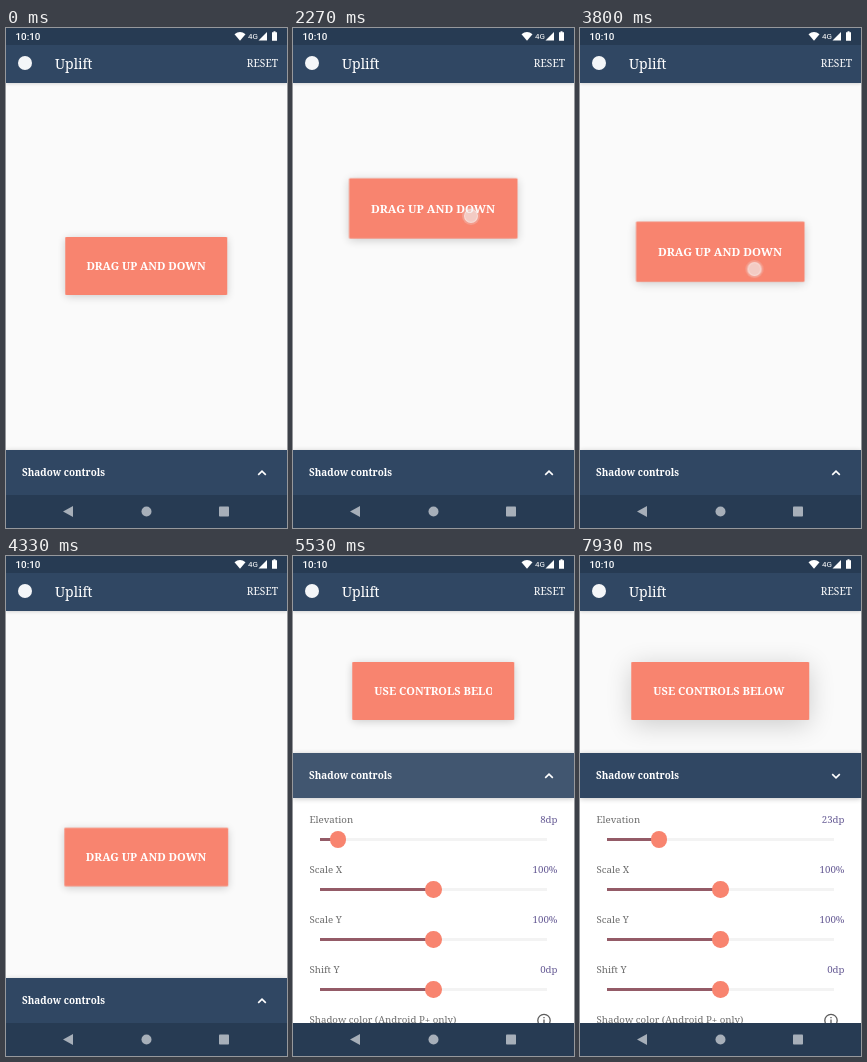
Write an HTML page that moves like this. It is 281 px wide and 500 px high and loops after 8000 ms.

```html
<!DOCTYPE html>
<html lang="en">
<head>
<meta charset="utf-8">
<title>Shadow controls</title>
<style>
@property --dp { syntax: "<integer>"; inherits: true; initial-value: 8; }

:root {
  --navy: #304763;
  --dark: #273b53;
  --coral: #f8846f;
  --go: cubic-bezier(.4, 0, .8, .7);
  --stop: cubic-bezier(.2, .3, .6, 1);
  --fling: cubic-bezier(.35, .3, .4, 1);
}
html, body { margin: 0; width: 100%; height: 100%; overflow: hidden; }
#stage {
  position: relative; width: 281px; height: 500px; overflow: hidden;
  background: #fafafa; font-family: "Noto Serif", serif;
  animation: elevate 8s infinite;
}
#stage * { position: absolute; box-sizing: border-box; }
#stage, #stage * { animation-duration: 8s; animation-iteration-count: infinite; animation-timing-function: linear; }
.t { line-height: 20px; white-space: nowrap; }

/* bars */
.status { width: 281px; height: 17px; background: var(--dark); }
.bar { top: 17px; width: 281px; height: 37.5px; background: var(--navy); box-shadow: 0 1px 3px rgba(0,0,0,.15); color: #fff; }
.logo { left: 12px; top: 11px; width: 14px; height: 14px; border-radius: 50%; background: #f4f6f8; }
.title { left: 49px; top: 8.5px; font-size: 14px; }
.reset { right: 9px; top: 8px; font-size: 10.2px; }
.clock { left: 9.5px; top: -1.5px; font: 500 9.8px/20px Roboto, sans-serif; color: #fff; }
.net { left: 242px; top: -1.5px; font: 8px/20px Roboto, sans-serif; color: #fff; }
.nav { top: 467px; width: 281px; height: 33px; background: var(--dark); }
svg { overflow: visible; }

/* card */
.card {
  left: 140.3px; top: 209px; width: 161.5px; height: 57.5px;
  background: var(--coral); border-radius: 1px; color: #fff;
  font-weight: 700; font-size: 11px;
  box-shadow: 0 calc(var(--dp) * .2px) calc(var(--dp) * 1.1px) rgba(0,0,0,.19);
  translate: -50% 0;
  animation-name: drag, lift, widen;
}
.card .t { line-height: 57px; }
.hint { width: 100%; text-align: center; animation-name: hide; }
.clip { left: 22px; width: 117.5px; height: 100%; overflow: hidden; animation-name: reveal; }
.next { left: 0; opacity: 0; animation-name: show; }
#stage .hint, #stage .next { animation-timing-function: step-end; }

/* panel */
.panel { top: 422px; width: 281px; height: 310px; background: #fff; animation-name: open; }
.head {
  width: 281px; height: 45px; overflow: hidden; z-index: 1;
  background: var(--navy); color: #fff; box-shadow: 0 1px 5px rgba(0,0,0,.22);
}
.head .t { left: 16px; top: 12px; font-weight: 700; font-size: 9.9px; }
.ripple {
  left: 9px; top: -104.5px; width: 263px; height: 263px; border-radius: 50%;
  background: #fff; opacity: 0; animation-name: ripple;
}
.chevron { left: 251px; top: 17.5px; animation-name: flip; }
.row { width: 281px; height: 50px; top: calc(57px + var(--i) * 50px); font-size: 9.7px; color: #6c6c6c; --x: 50; }
.row .t { left: 16.5px; }
.row .val { left: auto; right: 16.5px; color: #685d96; }
.live { --x: var(--dp); }
.live .val { counter-reset: dp var(--dp); }
#stage .live .val::before { content: counter(dp) "dp"; position: static; }
.track { left: 27px; top: 28px; width: 227px; height: 3px; background: #f3f3f3; }
.track i { height: 3px; width: calc(var(--x) * 1%); background: #945b67; }
.track b {
  left: calc(var(--x) * 1%); top: 1.5px; width: 16.5px; height: 16.5px; margin: -8.25px;
  border-radius: 50%; background: var(--coral);
}

.touch {
  width: 18px; height: 18px; margin: -9px; border-radius: 50%; opacity: 0;
  background: rgba(240,238,238,.68); background-clip: padding-box;
  border: 2px solid rgba(235,235,235,.25);
  box-shadow: inset 0 0 0 1px rgba(255,255,255,.35);
  animation-name: point, press;
}

@keyframes drag {
  0% { translate: -50% 0; }
  23.1% { translate: -50% 0; animation-timing-function: var(--go); }
  28.375% { translate: -50% -57.5px; animation-timing-function: var(--stop); }
  33.5% { translate: -50% -130px; }
  35.1% { translate: -50% -130px; animation-timing-function: ease-in-out; }
  40.7%, 43.9% { translate: -50% -117px; animation-timing-function: var(--go); }
  47.5% { translate: -50% -14.3px; animation-timing-function: var(--stop); }
  51.9% { translate: -50% 63px; }
  64.5% { translate: -50% 63px; animation-timing-function: ease-in; }
  65.875% { translate: -50% 53.4px; animation-timing-function: var(--fling); }
  69%, 100% { translate: -50% -103px; }
}
@keyframes lift {
  0%, 21.6% { scale: 1; }
  23.4%, 35.1% { scale: 1.04; animation-timing-function: ease-in-out; }
  40.7%, 43.9% { scale: 1; }
  45.6%, 52.2% { scale: 1.04; animation-timing-function: ease-out; }
  55.8%, 100% { scale: 1; }
}
@keyframes widen {
  0%, 69.15% { width: 161.5px; animation-timing-function: ease-in-out; }
  72.5%, 100% { width: 177.5px; }
}
@keyframes reveal {
  0%, 69.15% { width: 117.5px; animation-timing-function: ease-in-out; }
  72.5%, 100% { width: 142px; }
}
@keyframes hide { 0% { opacity: 1; } 68.75%, 100% { opacity: 0; } }
@keyframes show { 0% { opacity: 0; } 68.75%, 100% { opacity: 1; } }
@keyframes open {
  0%, 64.5% { translate: 0 0; animation-timing-function: ease-in; }
  65.875% { translate: 0 -13px; animation-timing-function: var(--fling); }
  69%, 100% { translate: 0 -225px; }
}
@keyframes ripple {
  0%, 63.8% { scale: .3; opacity: 0; }
  64.1% { scale: .45; opacity: .5; }
  65.875% { scale: 1; opacity: .5; }
  69.125% { scale: 1.25; opacity: .09; }
  70.5%, 100% { scale: 1.25; opacity: 0; }
}
@keyframes flip {
  0%, 69.15% { rotate: 0deg; animation-timing-function: ease-in-out; }
  72%, 100% { rotate: 180deg; }
}
@keyframes elevate {
  0%, 83.1% { --dp: 8; animation-timing-function: ease-in-out; }
  92.5%, 100% { --dp: 23; }
}
@keyframes point {
  0% { translate: 178px 245px; }
  23.1% { translate: 178px 245px; animation-timing-function: var(--go); }
  28.375% { translate: 178px 188px; animation-timing-function: var(--stop); }
  33.5%, 36% { translate: 177.5px 115.5px; }
  40%, 43.9% { translate: 174.5px 138.5px; animation-timing-function: var(--go); }
  47.5% { translate: 174.5px 241px; animation-timing-function: var(--stop); }
  51.9%, 55% { translate: 174.5px 318px; }
  60%, 64.5% { translate: 142px 449px; animation-timing-function: ease-in; }
  65.875% { translate: 142px 436px; animation-timing-function: var(--fling); }
  69% { translate: 142px 224px; }
  75%, 83.1% { translate: 45.2px 284.5px; animation-timing-function: ease-in-out; }
  92.5%, 100% { translate: 79.2px 284.5px; }
}
@keyframes press {
  0%, 21.6% { opacity: 0; }
  22.5%, 33.6% { opacity: 1; }
  34.6%, 43.7% { opacity: 0; }
  44.3%, 51.9% { opacity: 1; }
  52.8%, 63.8% { opacity: 0; }
  64.2%, 66.2% { opacity: 1; }
  67.5%, 81.8% { opacity: 0; }
  82.6%, 93.1% { opacity: 1; }
  95%, 100% { opacity: 0; }
}
</style>
</head>
<body>
<div id="stage">
  <div class="card">
    <div class="t hint">DRAG UP AND DOWN</div>
    <div class="clip"><div class="t next">USE CONTROLS BELOW</div></div>
  </div>

  <div class="bar">
    <div class="logo"></div>
    <div class="t title">Uplift</div>
    <div class="t reset">RESET</div>
  </div>
  <div class="status">
    <div class="t clock">10:10</div>
    <div class="t net">4G</div>
    <svg width="281" height="17" fill="#fff">
      <path d="M228.5 6.2Q234 2 239.5 6.2L234 12.8Z"/>
      <path d="M252.5 12.5H261V4Z"/>
      <path d="M266 4.3H267.5V3.3H269.5V4.3H271V12.8H266Z"/>
    </svg>
  </div>

  <div class="panel">
    <div class="head">
      <div class="ripple"></div>
      <div class="t">Shadow controls</div>
      <svg class="chevron" width="10" height="10" fill="none" stroke="#fff" stroke-width="1.6"><path d="M1.2 6.9L5 3.1L8.8 6.9"/></svg>
    </div>
    <div class="row live" style="--i:0"><div class="t">Elevation</div><div class="t val"></div><div class="track"><i></i><b></b></div></div>
    <div class="row" style="--i:1"><div class="t">Scale X</div><div class="t val">100%</div><div class="track"><i></i><b></b></div></div>
    <div class="row" style="--i:2"><div class="t">Scale Y</div><div class="t val">100%</div><div class="track"><i></i><b></b></div></div>
    <div class="row" style="--i:3"><div class="t">Shift Y</div><div class="t val">0dp</div><div class="track"><i></i><b></b></div></div>
    <div class="row" style="--i:4">
      <div class="t">Shadow color (Android P+ only)</div>
      <svg width="281" height="20" fill="none" stroke="#5c5c5c" stroke-width="1.3"><circle cx="251" cy="10.5" r="6.2"/><path d="M251 7V8.3M251 9.6V14"/></svg>
    </div>
  </div>

  <div class="nav">
    <svg width="281" height="33" fill="#a7afb9">
      <path d="M57 16.5L67 11V22Z"/>
      <circle cx="140.5" cy="16.5" r="5"/>
      <rect x="213" y="11.5" width="10" height="10" rx=".8"/>
    </svg>
  </div>
  <div class="touch"></div>
</div>
</body>
</html>
```
